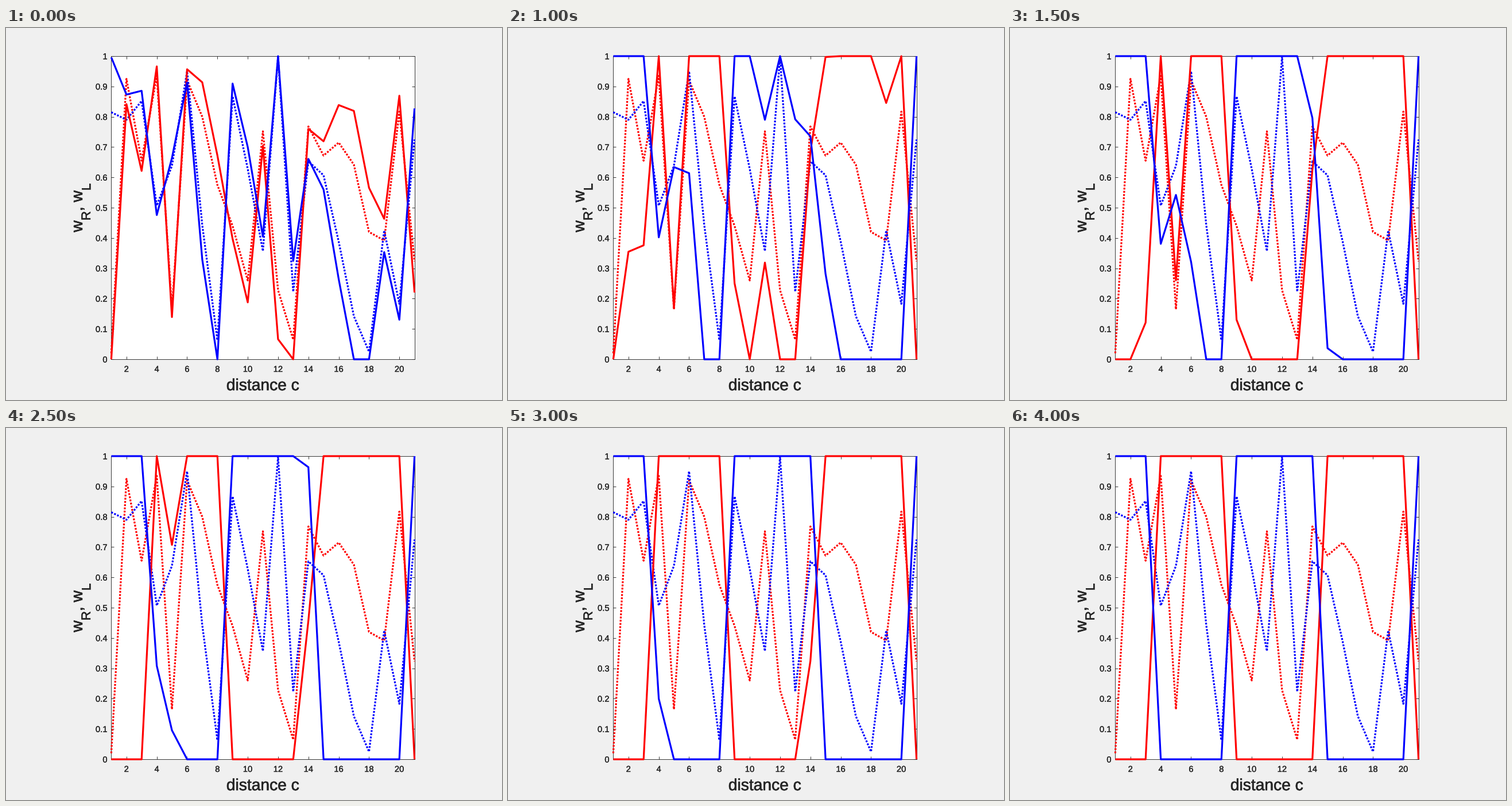
A matplotlib script for the animation above (8000 ms loop, 864 px wide and 648 px high).

```python
import matplotlib.pyplot as plt
import numpy as np
from matplotlib.animation import FuncAnimation
from matplotlib.patheffects import withStroke

W, H = 864, 648
LEFT, RIGHT, TOP, BOTTOM = 183.4, 711.6, 49.0, 577.1
INK, RED, BLUE = "#262626", "#ff0000", "#0000ff"
STEP_MS, FRAMES = 500, 16

plt.rcParams["font.family"] = "Liberation Sans"

# Random starting weights of the two competing inputs.
distance = np.arange(1, 22)
right_start = np.array([
    .020, .925, .655, .935, .165, .920, .800, .575, .440, .260, .752,
    .228, .065, .768, .672, .715, .642, .420, .392, .817, .323])
left_start = np.array([
    .815, .790, .852, .507, .638, .950, .443, .063, .867, .628, .357,
    .998, .223, .653, .607, .388, .142, .025, .425, .183, .725])

# Near neighbours help each other, farther ones inhibit; distance wraps round.
KERNEL = [.205, .085, .010, -.020, -.028, -.033, -.015]
FIRST_RATE = 0.85


def compete(right, left, rate):
    """Move both inputs apart by the filtered difference, within 0 to 1."""
    lead = right - left
    gain = KERNEL[0] * lead
    for reach, weight in enumerate(KERNEL[1:], 1):
        gain = gain + weight * (np.roll(lead, reach) + np.roll(lead, -reach))
    return (np.clip(right + rate * gain, 0, 1),
            np.clip(left - rate * gain, 0, 1))


states = [compete(right_start, left_start, FIRST_RATE)]
while len(states) < FRAMES:
    states.append(compete(*states[-1], 1))

# At 72 dpi one point is one pixel.
fig = plt.figure(figsize=(W / 72, H / 72), dpi=72, facecolor="#f0f0f0")
ax = fig.add_axes([LEFT / W, 1 - BOTTOM / H,
                   (RIGHT - LEFT) / W, (BOTTOM - TOP) / H])
ax.set(xlim=(1, 21), ylim=(0, 1),
       xticks=range(2, 21, 2), yticks=np.arange(11) / 10)
ax.tick_params(direction="in", length=5.3, width=0.9, color=INK,
               top=True, right=True, labelbottom=False, labelleft=False)
for spine in ax.spines.values():
    spine.set(linewidth=0.9, color=INK)


def label(x, y, text, size, **style):
    weight = withStroke(linewidth=size / 45, foreground=INK)
    fig.text(x / W, 1 - y / H, text, fontsize=size, color=INK,
             va="baseline", path_effects=[weight], **style)


for value in range(2, 21, 2):
    label(LEFT + (value - 1) * (RIGHT - LEFT) / 20, 599, str(value), 14.8,
          ha="center")
for tenth in range(11):
    label(176.7, BOTTOM - tenth * (BOTTOM - TOP) / 10 + 5.4,
          f"{tenth / 10:g}", 14.8, ha="right")

label(447.5, 631, "distance c", 28.2, ha="center")
for x, y, text, size in [(133, 355.7, "w", 28.2), (147, 335.3, "R", 22.5),
                         (133, 319.1, ", w", 28.2), (147, 283, "L", 22.5)]:
    label(x, y, text, size, ha="left", rotation=90, rotation_mode="anchor")


def curve(values, color, **style):
    return ax.plot(distance, values, color=color, linewidth=3.2,
                   clip_on=False, zorder=3, **style)[0]


dots = dict(linestyle=(0, (1, 0.75)), dash_capstyle="butt")
curve(right_start, RED, **dots)
curve(left_start, BLUE, **dots)
right_line = curve(right_start, RED, solid_capstyle="butt")
left_line = curve(left_start, BLUE, solid_capstyle="butt")


def draw(step):
    right, left = states[step]
    right_line.set_ydata(right)
    left_line.set_ydata(left)
    return right_line, left_line


animation = FuncAnimation(fig, draw, frames=FRAMES, interval=STEP_MS,
                          repeat=True, repeat_delay=0)
plt.show()
```
